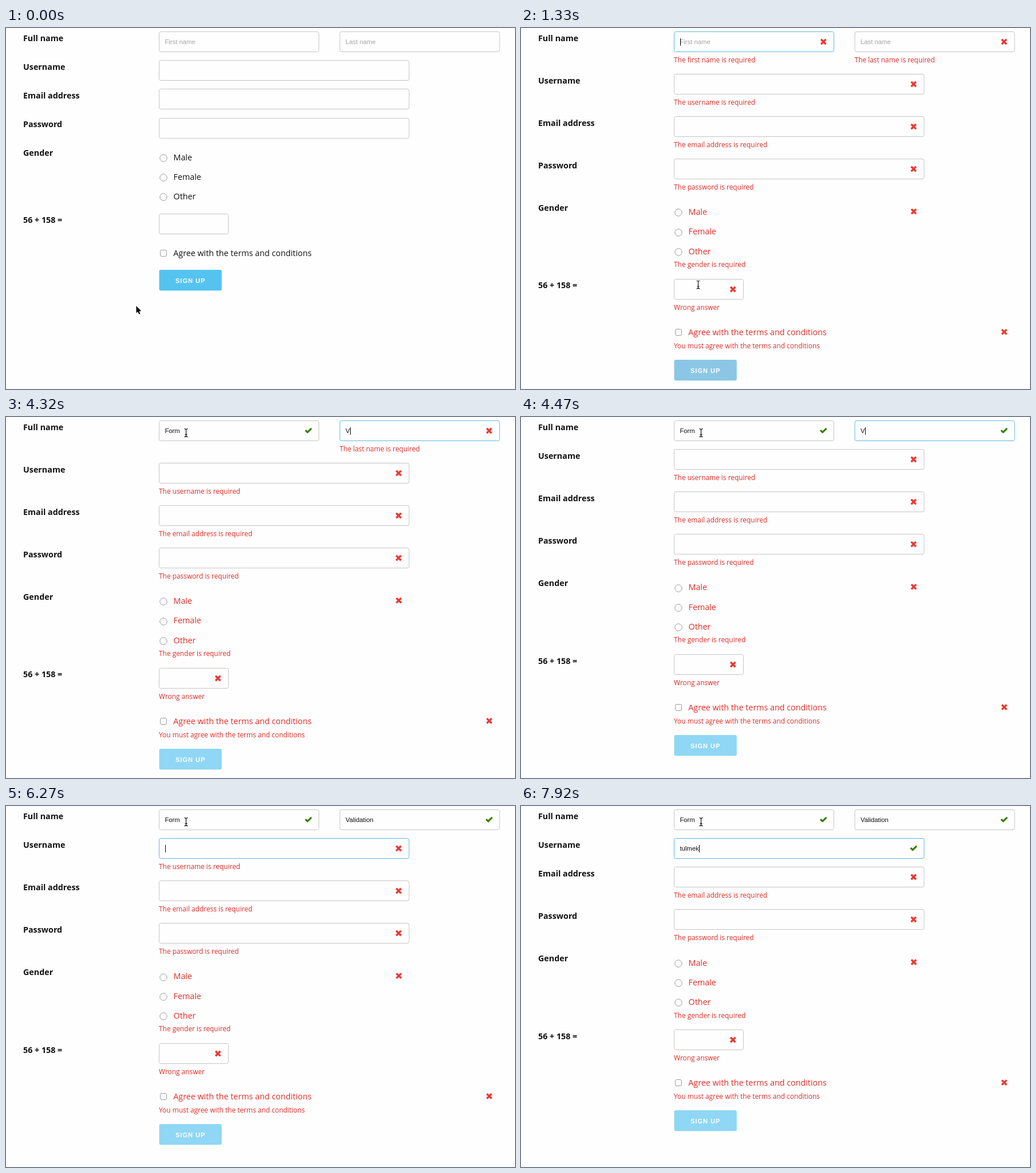
These frames come from a looping animation (889x630 px, 8000 ms). An HTML page with a canvas:

```html
<!DOCTYPE html>
<html lang="en">
<head>
<meta charset="utf-8">
<title>Sign-up form validation</title>
<style>
  html, body { margin: 0; width: 100%; height: 100%; overflow: hidden; background: #fefefe; }
  canvas { display: block; }
</style>
</head>
<body>
<canvas id="stage" width="889" height="630"></canvas>
<script>
const ctx = document.getElementById('stage').getContext('2d');
const LOOP = 8000;
const BG = '#fefefe', INK = '#111', RED = '#e02d27';
const SANS = '"Open Sans", sans-serif';
const LABEL = `bold 14.3px ${SANS}`;
const BODY = `14.3px ${SANS}`;
const SMALL = `11.9px ${SANS}`;
const INPUT = '11.3px "Liberation Sans", Arial, sans-serif';
const BUTTON = 'bold 11px "Liberation Sans", Arial, sans-serif';
const LEFT = 267, ROW = 50.2, ERROR_ROW = 23.85;
const FIRST = 'Form', LAST = 'Validation', USER = 'tulmek';

// Key times: [ms, number of characters typed]
const firstKeys = [[2820, 1], [3120, 2], [3270, 3], [3420, 4]];
const lastKeys = [[4320, 1], [4620, 2], [4770, 3], [5070, 6], [5370, 7], [5520, 8], [5670, 9], [5820, 10]];
const userKeys = [[7020, 1], [7170, 2], [7320, 3], [7470, 4], [7620, 5], [7920, 6]];

const at = (t, keys) => keys.reduce((v, [time, value]) => t >= time ? value : v, 0);
const smooth = x => x * x * (3 - 2 * x);
const between = (t, a, b) => t >= a && t < b;

// Progress of a move shown in six discrete steps
function stepped(t, start, end) {
  if (t < start) return 0;
  const n = Math.floor((t - start) / ((end - start) / 5) + 0.01) + 1;
  return smooth(Math.min(n, 6) / 6);
}

function text(str, x, y, font, color) {
  ctx.font = font;
  ctx.fillStyle = color;
  ctx.fillText(str, x, Math.round(y));
}

function box(x, y, w, h, r) {
  ctx.beginPath();
  ctx.roundRect(x, y, w, h, r);
}

function poly(points, x, y) {
  ctx.beginPath();
  points.forEach(([px, py]) => ctx.lineTo(x + px, y + py));
  ctx.closePath();
}

function cross(x, y) {
  ctx.strokeStyle = '#eb3a32';
  ctx.lineWidth = 3.4;
  ctx.lineCap = 'butt';
  ctx.beginPath();
  ctx.moveTo(x - 4.2, y - 4.2);
  ctx.lineTo(x + 4.2, y + 4.2);
  ctx.moveTo(x + 4.2, y - 4.2);
  ctx.lineTo(x - 4.2, y + 4.2);
  ctx.stroke();
}

function check(x, y) {
  ctx.strokeStyle = '#347f00';
  ctx.lineWidth = 3.2;
  ctx.lineCap = 'butt';
  ctx.lineJoin = 'miter';
  ctx.beginPath();
  ctx.moveTo(x - 5.2, y - 0.8);
  ctx.lineTo(x - 1.6, y + 2.6);
  ctx.lineTo(x + 5.3, y - 4.1);
  ctx.stroke();
}

function field(x, top, w, o = {}) {
  const y = Math.round(top);
  box(x + 0.5, y + 0.5, w, 35, 3);
  ctx.strokeStyle = o.focus ? '#61b9e1' : '#c6c6c6';
  ctx.lineWidth = 1;
  ctx.stroke();
  const value = o.value || '';
  if (value) text(value, x + 10.4, y + 22.4, INPUT, '#111');
  else if (o.hint) text(o.hint, x + 10.4, y + 22.4, INPUT, '#a4a4a4');
  if (o.focus && o.caret) {
    ctx.font = INPUT;
    ctx.fillStyle = '#000';
    ctx.fillRect(Math.round(x + 10.9 + ctx.measureText(value).width), y + 12, 1, 13);
  }
  if (o.state === 'bad') cross(x + w - 17.8, y + 18);
  if (o.state === 'good') check(x + w - 17.8, y + 18);
  if (o.message) text(o.message, x, top + 54, SMALL, RED);
}

const label = (str, top) => text(str, 30, top + 16.5, LABEL, INK);

function radio(x, y) {
  ctx.beginPath();
  ctx.arc(x, y, 6.2, 0, 7);
  ctx.strokeStyle = '#9c9c9c';
  ctx.lineWidth = 1;
  ctx.stroke();
}

function checkbox(x, y) {
  box(x - 5.5, y - 5.5, 11, 11, 2.5);
  ctx.strokeStyle = '#9c9c9c';
  ctx.lineWidth = 1;
  ctx.stroke();
}

function button(top, hover, disabled) {
  const mix = (a, b) => Math.round(a + (b - a) * hover);
  const y = Math.round(top);
  ctx.globalAlpha = disabled ? 0.65 : 1;
  box(267.5, y, 109.3, 36.3, 3);
  ctx.fillStyle = `rgb(${mix(85, 79)}, ${mix(195, 171)}, ${mix(240, 216)})`;
  ctx.fill();
  ctx.globalAlpha = 1;
  ctx.letterSpacing = '1px';
  text('SIGN UP', 296, y + 23, BUTTON, '#fff');
  ctx.letterSpacing = '0px';
}

function arrow(x, y) {
  poly([[0, 0], [0, 12.6], [2.8, 10], [4.8, 14.6], [6.9, 13.7], [5, 9.2], [8.8, 9]], x, y);
  ctx.lineJoin = 'round';
  ctx.strokeStyle = '#fff';
  ctx.lineWidth = 2;
  ctx.stroke();
  ctx.fillStyle = '#000';
  ctx.fill();
}

function hand(x, y) {
  poly([[-2.6, 0.3], [-1.2, -0.7], [0.2, 0.3], [1.3, 4.2], [3, 3.8], [4, 5], [5.6, 4.5],
    [6.6, 5.8], [8.2, 5.7], [8.9, 7.2], [8.3, 10.4], [7, 12.5], [6.8, 15], [0.6, 15],
    [-0.8, 12.4], [-4.6, 8.4], [-4.4, 6.8], [-2.8, 6.8], [-0.8, 8.6]], x, y);
  ctx.lineJoin = 'round';
  ctx.fillStyle = '#fff';
  ctx.fill();
  ctx.strokeStyle = '#111';
  ctx.lineWidth = 1.2;
  ctx.stroke();
  ctx.beginPath();
  [1.6, 3.7, 5.8].forEach(dx => {
    ctx.moveTo(x + dx, y + 8.5);
    ctx.lineTo(x + dx + 0.2, y + 12);
  });
  ctx.lineWidth = 0.9;
  ctx.stroke();
}

function beam(x, y) {
  const path = () => {
    ctx.beginPath();
    ctx.moveTo(x - 3, y - 7);
    ctx.quadraticCurveTo(x, y - 7, x, y - 5);
    ctx.quadraticCurveTo(x, y - 7, x + 3, y - 7);
    ctx.moveTo(x, y - 5.5);
    ctx.lineTo(x, y + 5.5);
    ctx.moveTo(x - 3, y + 7);
    ctx.quadraticCurveTo(x, y + 7, x, y + 5);
    ctx.quadraticCurveTo(x, y + 7, x + 3, y + 7);
    ctx.moveTo(x - 2, y + 3);
    ctx.lineTo(x + 2, y + 3);
  };
  ctx.lineCap = 'butt';
  path();
  ctx.strokeStyle = '#fff';
  ctx.lineWidth = 2.6;
  ctx.stroke();
  path();
  ctx.strokeStyle = '#111';
  ctx.lineWidth = 1.2;
  ctx.stroke();
}

function pointer(t) {
  if (t < 1330) {
    const p = stepped(t, 300, 1030);
    const x = 227.5 + 82.5 * p, y = 485 - 36.5 * p;
    (p > 0.72 ? hand : arrow)(x, y);
    return;
  }
  const p = stepped(t, 1630, 2370);
  const x = 309.5 + 5 * p, y = 448 - 420.3 * p;
  (between(y, 303, 404) ? arrow : beam)(x, y);
}

function draw(t) {
  const sent = t >= 1330;
  const firstOk = t >= 2970, lastOk = t >= 4470, userOk = t >= 7920;
  const state = ok => !sent ? '' : ok ? 'good' : 'bad';
  const required = (name, ok) => sent && !ok ? `The ${name} is required` : '';
  const choice = sent ? RED : INK;

  ctx.fillStyle = BG;
  ctx.fillRect(0, 0, 889, 630);

  let y = 6;
  label('Full name', y);
  field(LEFT, y, 279, {
    hint: 'First name', value: FIRST.slice(0, at(t, firstKeys)),
    focus: between(t, 1330, 3720), caret: !between(t, 1780, 2370),
    state: state(firstOk), message: required('first name', firstOk)
  });
  field(582.6, y, 279, {
    hint: 'Last name', value: LAST.slice(0, at(t, lastKeys)),
    focus: between(t, 3720, 6270), caret: true,
    state: state(lastOk), message: required('last name', lastOk)
  });
  y += ROW + (sent && !lastOk ? ERROR_ROW : 0);

  label('Username', y);
  field(LEFT, y, 436.5, {
    value: USER.slice(0, at(t, userKeys)),
    focus: t >= 6270, caret: !between(t, 6720, 7020),
    state: state(userOk),
    message: between(t, 7170, 7920)
      ? 'The username must be more than 6 and less than 30 characters long'
      : required('username', userOk)
  });
  y += ROW + (sent && !userOk ? ERROR_ROW : 0);

  [['Email address', 'email address'], ['Password', 'password']].forEach(([title, name]) => {
    label(title, y);
    field(LEFT, y, 436.5, { state: state(false), message: required(name, false) });
    y += ROW + (sent ? ERROR_ROW : 0);
  });

  label('Gender', y);
  ['Male', 'Female', 'Other'].forEach((name, i) => {
    const line = y + 24 + 34.2 * i;
    radio(275, Math.round(line - 3.8));
    text(name, 292.5, line, BODY, choice);
  });
  if (sent) {
    cross(686, y + 18);
    text('The gender is required', LEFT, y + 115, SMALL, RED);
  }
  y += 116.8 + (sent ? 18.9 : 0);

  label('56 + 158 =', y);
  field(LEFT, y, 121, { state: state(false), message: sent ? 'Wrong answer' : '' });
  y += 68.8 + (sent ? 23.6 : 0);

  checkbox(275, Math.floor(y + 1.3));
  text('Agree with the terms and conditions', 292.3, y + 5.2, BODY, choice);
  if (sent) {
    cross(844, y);
    text('You must agree with the terms and conditions', LEFT, y + 28.7, SMALL, RED);
  }
  y += 29.7 + (sent ? 19.1 : 0);

  const hover = at(t, [[740, 0.35], [880, 0.75], [1030, 1], [1630, 0.15], [1780, 0]]);
  button(y, hover, sent);
  pointer(t);
}

const begin = performance.now();
function frame() {
  draw((performance.now() - begin) % LOOP);
  requestAnimationFrame(frame);
}
draw(0);
requestAnimationFrame(frame);
</script>
</body>
</html>
```
